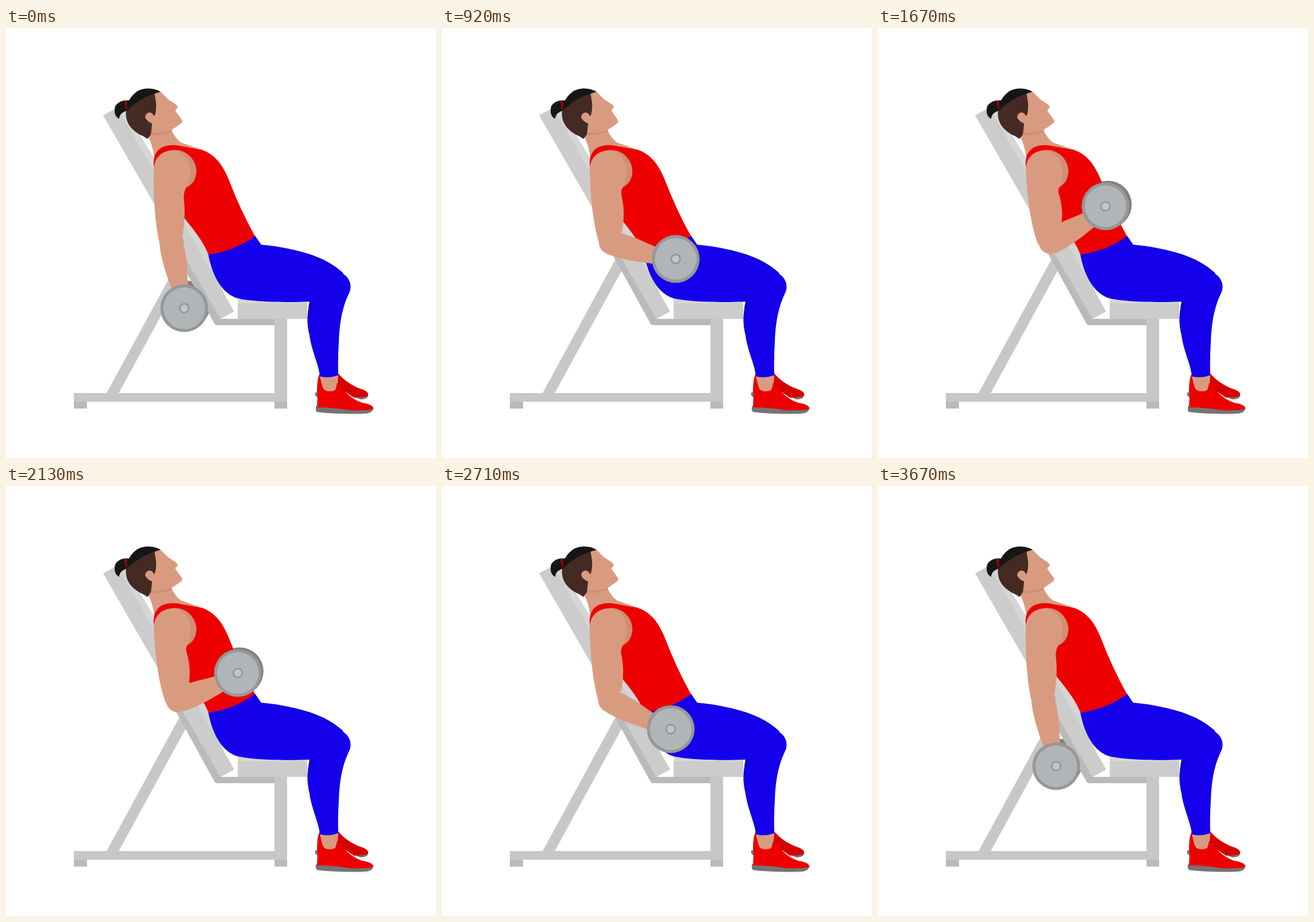
Animation, 748 px wide and 748 px high, one loop 3.75 s. Source, as an HTML page:

```html
<!DOCTYPE html>
<html lang="en">
<head>
<meta charset="utf-8">
<title>Incline dumbbell curl</title>
<style>
  html, body { margin: 0; width: 100%; height: 100%; overflow: hidden; background: #fff; }
  svg { display: block; width: 100vw; height: 100vh; }
  .skin { fill: #d99b80; }
  .shade { fill: #cf8f73; }
  .red { fill: #ee0000; }
  .blue { fill: #1500eb; }
  .steel { fill: #c7c7c7; }
  .dark { fill: #bababa; }
  .pad { fill: #cccccc; }
  .light { fill: #d6d6d6; }
  .sole { fill: #747474; }
  .rim { fill: #979797; }
</style>
</head>
<body>
<svg viewBox="0 0 748 748">
  <circle id="farPlate" r="41.5" fill="#808080"/>

  <g id="bench">
    <path class="steel" d="M174 637L303 400L317 414L195 637Z"/>
    <path class="steel" d="M118 635H467V506H489V650H118Z"/>
    <path class="dark" d="M118 650H141V662H118ZM467 650H489V662H467Z"/>
    <path class="dark" d="M296 393L363 515Q364 517 367 517H467V506H373L312 393Z"/>
    <path class="light" d="M194 138L203 142Q208 145 211 149L258 227L312 325L350 388L380 464Z"/>
    <path class="pad" d="M169 152L194 138L397 493L373 506Z"/>
    <path class="pad" d="M403 471H524V506H403Z"/>
    <path class="light" d="M403 469H524V479H403Z"/>
  </g>

  <g id="feet">
    <path class="sole" d="M538 634L545 633V643Q536 642 538 634ZM605 641L630 638Q630 646 616 646Z"/>
    <path fill="#d60000" d="M547 600Q541 606 541 634L550 634ZM577 600C590 615 605 624 621 629Q631 633 630 639Q627 643 605 643L575 622Z"/>
    <path class="skin" d="M546 604L578 602L577 622Q576 633 562 633Q550 632 549 625Z"/>
    <path class="sole" d="M540 657L639 661Q639 671 620 671Q575 672 541 668Q537 664 540 657Z"/>
    <path class="red" d="M543 612Q545 608 547 611L551 625Q553 632 562 632Q574 632 574 626L576 617C590 632 599 645 620 652Q640 655 639 663Q625 666 598 665Q570 660 541 660Z"/>
  </g>

  <g id="body">
    <path class="blue" d="M350 394Q396 388 433 361L444 377C500 381 558 401 585 425Q587 429 591 431C600 440 602 452 596 463C587 482 580 508 579 545Q577 575 578 604Q562 610 546 606C545 588 531 560 528 535C523 515 524 500 526 490L529 476C480 478 420 476 399 469C370 457 357 422 352 394Z"/>
    <path fill="#1200cc" d="M496 385C535 393 565 406 585 425L587 430C565 410 535 398 496 385ZM528 476H538Q529 490 528 512Q523 495 528 476Z"/>
    <path class="skin" d="M246 186L253 168L284 165L288 178Q294 191 304 199L341 212L258 226Q256 206 246 186Z"/>
    <path class="red" d="M257 242C255 220 264 206 285 204Q293 203 302 205L341 212C369 222 380 246 388 265Q407 315 433 362Q398 388 352 394Q343 370 311 332L290 300Z"/>
    <path class="shade" d="M278 216C306 203 333 226 331 252Q329 271 314 277L295 250Z"/>
  </g>

  <g id="head">
    <path class="skin" d="M256 114L269 111L282 124Q290 129 297 134Q300 138 297 141Q293 142 296 146L306 160Q308 164 303 167Q291 176 285 179Q270 185 252 184Z"/>
    <path class="shade" d="M253 182Q273 183 288 177L289 180Q273 187 253 186Z"/>
    <path fill="#452a24" d="M258 111L261 130Q262 142 259 152L254 160L254 167Q253 178 252 185L246 193L240 189C220 180 206 166 209 143Q222 118 258 111Z"/>
    <path class="skin" d="M257 153Q255 147 249 147Q243 148 242 155Q244 162 254 166L262 162V151Z"/>
    <path fill="#161616" d="M269 111C259 104 239 103 227 111Q218 118 214 126Q198 124 190 136Q186 153 197 158Q197 148 210 144Q232 121 269 111Z"/>
    <path fill="#a40000" d="M206 127L210 126L211 143L208 140Z"/>
  </g>

  <path id="upperArm" class="skin"/>
  <g id="forearm" class="skin">
    <circle r="21"/>
    <path d="M-2 21C22 24 52 20 82 15L95 14V-13L78 -14.5C58 -16 45 -20 25 -20L-4 -20Z"/>
  </g>
  <g id="plate">
    <circle class="rim" r="41.5"/>
    <circle r="36.3" fill="#b0b5b8"/>
    <circle class="rim" r="9.2"/>
    <circle r="6.4" fill="#c3c4c4"/>
  </g>
</svg>
<script>
const LOOP = 3750;
const LOW = 10.8, HIGH = 120.5;   // forearm angle from straight down

const byId = id => document.getElementById(id);
const mix = (a, b, k) => a + (b - a) * k;
const place = (id, x, y, turn = 0) =>
  byId(id).setAttribute("transform", `translate(${x} ${y}) rotate(${turn})`);

// cubic-bezier(x1, 0, x2, 1) over a span of time
function ease(t, from, to, x1, x2) {
  const x = Math.min(1, Math.max(0, (t - from) / (to - from)));
  let lo = 0, hi = 1;
  for (let i = 0; i < 20; i++) {
    const s = (lo + hi) / 2, r = 1 - s;
    if (3 * r * r * s * x1 + 3 * r * s * s * x2 + s ** 3 < x) lo = s;
    else hi = s;
  }
  return lo * lo * (3 - 2 * lo);
}

const liftAt = t => ease(t, 165, 1710, .36, .5) - ease(t, 1815, 3670, .35, .56);

// the biceps swells as the arm bends
function upperArm(bend) {
  const p = (x0, y0, x1, y1) => `${mix(x0, x1, bend)} ${mix(y0, y1, bend)} `;
  return "M257 245C258 225 272 213 290 213C312 215 322 233 321 252Q320 266 "
    + p(314, 277, 316, 276) + "Q" + p(308, 287, 311, 282) + p(309.5, 298, 314.5, 292)
    + "Q" + p(313, 325, 322, 318) + p(307, 362, 317, 348)
    + "L" + p(290, 375, 300, 375) + p(266.5, 372, 277, 376)
    + "C" + p(260, 340, 266, 345) + p(256, 300, 259, 300) + "257 245Z";
}

function draw(t) {
  const lift = Math.max(0, liftAt(t));
  const angle = mix(LOW, HIGH, lift), bend = lift * 1.15;
  const rad = angle * Math.PI / 180, s = Math.sin(rad), c = Math.cos(rad);

  // the elbow drifts forward, the wrist curls above the forearm
  const drift = bend ** .6, drop = 5 * Math.sqrt(bend);
  const ex = 288 + 9 * drift, ey = 372 - 4 * drift;
  const reach = 117.6 - 3 * bend * bend;
  const px = ex + reach * s, py = ey + reach * c;

  byId("upperArm").setAttribute("d", upperArm(bend));
  place("forearm", ex - drop * c, ey + drop * s, 90 - angle);
  place("plate", px, py);

  // the far dumbbell sways slightly against the near one
  const sway = Math.sin(Math.PI * Math.sqrt(lift));
  place("farPlate", px + 4 - 7 * sway, py - 3 - 3.5 * (1 - lift) ** 8);
}

const start = performance.now();
function tick() {
  draw((performance.now() - start) % LOOP);
  requestAnimationFrame(tick);
}
tick();
</script>
</body>
</html>
```
